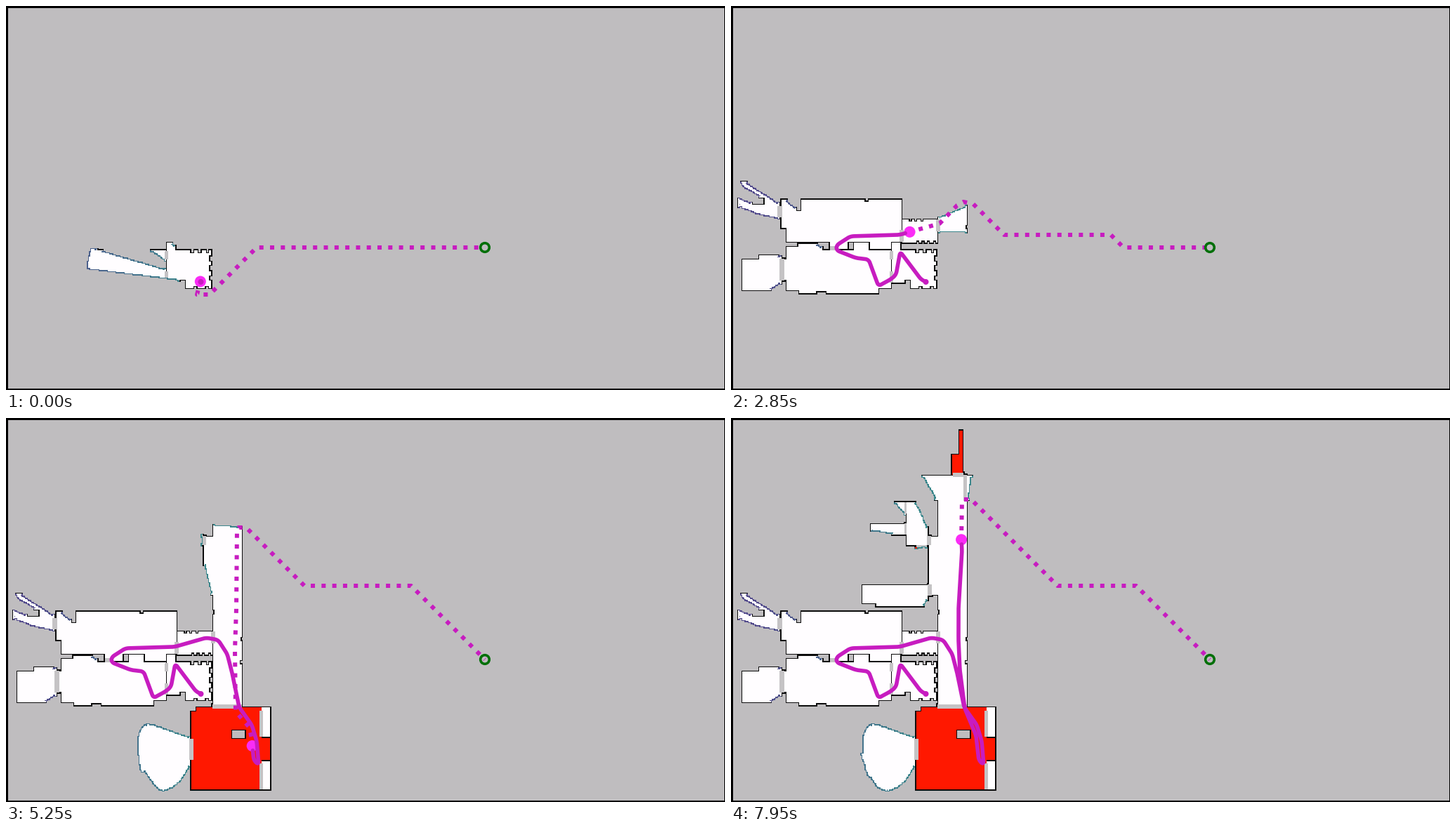
These frames come from a looping animation (1024 by 547 pixels, 8 s). A matplotlib script:

```python
import numpy as np
import matplotlib.pyplot as plt
from matplotlib.animation import FuncAnimation
from matplotlib.patches import Circle, Rectangle

WIDTH, HEIGHT, DPI = 1024, 547, 64
PX = 72 / DPI                      # points per pixel
FRAMES, STEP = 160, 50
CELL, COLS, ROWS = 1.5, 683, 365   # map grid
SENSOR = 161                       # sensor range in pixels

WALL, FREE, RED, DOOR = range(4)
GREY, BLACK = (191, 189, 191), (12, 12, 12)
FILL = np.array([BLACK, (255, 253, 255), (255, 24, 0), (197, 195, 197)], np.uint8)
TRAIL, ROBOT, GOAL = "#c71cc0", "#fa2cf6", "#006f08"
TARGET = (682, 344)

label = np.zeros((ROWS, COLS), np.uint8)


# ---- floor plan: everything that is not carved out is wall ----

def cells(*values):
    return [int(v / CELL) for v in values]


def room(x0, y0, x1, y1, kind=FREE):
    """Carve the space inside walls that run along the given sides."""
    c0, r0, c1, r1 = cells(x0, y0, x1, y1)
    label[r0 + 1:r1, c0 + 1:c1] = kind


def block(x0, y0, x1, y1, kind=WALL):
    c0, r0, c1, r1 = cells(x0, y0, x1, y1)
    label[r0:r1 + 1, c0:c1 + 1] = kind


def vdoor(x, y0, y1, width=4):
    block(x - width / 2, y0, x + width / 2, y1, DOOR)


def hdoor(y, x0, x1, width=4):
    block(x0, y - width / 2, x1, y + width / 2, DOOR)


def build_start_room():
    room(229, 347, 293, 403)
    room(229, 337, 242, 350)
    block(229, 395, 255, 403)
    block(248, 391, 255, 395)
    for x in range(263, 290, 11):
        block(x, 347, x + 4, 352)
    for y in range(356, 395, 14):
        block(290, y, 293, y + 7)
    for x in (267, 284):
        block(x, 400, x + 5, 403)


def build_west():
    room(79, 347, 229, 410)                 # lower hall and its recesses
    room(79, 343, 97, 349)
    room(95, 338, 131, 349)
    room(174, 337, 197, 349)
    block(79, 405, 96, 410)
    block(122, 407, 136, 410)
    block(211, 403, 229, 410)
    room(16, 361, 72, 406)                  # west room
    room(40, 355, 72, 363)
    room(67, 360, 82, 391)
    room(79, 275, 243, 337)                 # upper hall and its recesses
    room(71, 275, 81, 317)
    room(140, 335, 167, 347)
    room(197, 335, 229, 347)
    block(93, 275, 99, 292)
    block(191, 275, 196, 278)
    room(10, 250, 69, 306)                  # far west nook
    block(30, 273, 47, 282)
    room(243, 304, 294, 338)                # link to the corridor
    for x in range(254, 275, 8):
        block(x, 304, x + 3, 307)
    for x in range(264, 290, 8):
        block(x, 335, x + 3, 338)


def build_corridor():
    room(294, 110, 336, 412)
    room(281, 168, 297, 253)
    room(250, 81, 360, 118)                 # lobby
    block(294, 274, 296, 280)
    block(335, 313, 336, 317)
    block(334, 346, 336, 350)
    room(314, 51, 331, 81, RED)
    room(324, 17, 331, 53, RED)
    room(249, 119, 281, 182)                # side rooms
    room(198, 150, 249, 167)
    room(230, 119, 249, 146)
    room(231, 183, 281, 200, RED)
    room(187, 237, 281, 269)
    block(187, 264, 206, 269)


def build_red_room():
    room(263, 412, 377, 530, RED)
    room(150, 425, 263, 540)
    block(263, 412, 270, 417)
    block(322, 444, 341, 457)
    for y0, y1, side in ((412, 455, 455), (488, 530, 488)):
        room(363, y0, 377, y1)
        block(365, side, 377, side)
        vdoor(363, y0 + 5, y1 - 2, 3)


def build_doors():
    vdoor(73, 360, 391, 6)
    vdoor(69.5, 286, 301, 5)
    vdoor(229, 350, 361, 3)
    vdoor(229, 379, 394, 3)
    hdoor(345, 141, 152, 5)
    vdoor(243, 320, 335)
    vdoor(295, 305, 320)
    hdoor(411, 295, 335)
    vdoor(264, 458, 487)
    hdoor(81, 317, 330)
    vdoor(333, 82, 117, 3)
    vdoor(282, 169, 181)
    vdoor(249, 151, 166, 2)
    vdoor(249, 121, 136, 2)
    hdoor(183, 265, 278, 2)
    vdoor(283, 238, 252)


for build in (build_start_room, build_west, build_corridor, build_red_room, build_doors):
    build()


# ---- robot motion: constant speed along a rounded path ----

CORNERS = np.array([
    (278, 393), (271, 390), (241, 350), (235, 383), (228, 389), (210, 399), (196, 361),
    (178, 359), (150, 348), (150, 341), (170, 328), (240, 326), (285, 313), (302, 316),
    (315, 336), (322, 363), (332, 412), (350, 437), (357, 460), (360, 494), (353, 488),
    (349, 452), (333, 414), (326, 360), (324, 318), (324, 272), (329, 190), (328, 172)], float)
TICK = 10
LAST = (FRAMES - 1) * STEP


def along(pts, count):
    """Points at equal distances along a polyline."""
    dist = np.r_[0, np.cumsum(np.hypot(*np.diff(pts, axis=0).T))]
    s = np.linspace(0, dist[-1], count)
    return np.column_stack([np.interp(s, dist, pts[:, k]) for k in (0, 1)])


def rounded(pts, half=10):
    padded = np.pad(pts, ((half, half), (0, 0)), mode="edge")
    kernel = np.ones(2 * half + 1) / (2 * half + 1)
    return np.column_stack([np.convolve(padded[:, k], kernel, "valid") for k in (0, 1)])


path = along(rounded(along(CORNERS, 1800)), LAST // TICK + 1)


# ---- exploration: the step at which each cell is first seen ----

def shifts(grid):
    return [np.roll(grid, (dy, dx), (0, 1))
            for dy in (-1, 0, 1) for dx in (-1, 0, 1) if dy or dx]


def spread(mask):
    return np.logical_or.reduce(shifts(mask))


def explore():
    seen = np.full((ROWS, COLS), FRAMES, int)
    angle = np.linspace(0, 2 * np.pi, 1400, endpoint=False)[:, None]
    reach = np.arange(0, SENSOR / CELL, .7)
    dx, dy = np.cos(angle) * reach, np.sin(angle) * reach
    for n in range(FRAMES):
        x, y = path[n * STEP // TICK] / CELL
        cx = np.clip((x + dx).astype(int), 0, COLS - 1)
        cy = np.clip((y + dy).astype(int), 0, ROWS - 1)
        hit = label[cy, cx] == WALL
        hit[:, :4] = False
        clear = ~np.logical_or.accumulate(hit, axis=1)
        cy, cx = cy[clear], cx[clear]
        seen[cy, cx] = np.minimum(seen[cy, cx], n)
    # cells touching a wall are known as soon as a neighbour is
    seen[label == WALL] = FRAMES
    by_wall = spread(label == WALL) & (label != WALL)
    nearest = np.minimum.reduce(shifts(seen))
    return np.where(by_wall, np.minimum(seen, nearest), seen)


seen = explore()

# frontier colour drifts from violet in the west to teal in the east
mix = np.clip((np.arange(COLS) * CELL - 40) / 220, 0, 1)[:, None]
frontier = ((1 - mix) * (84, 76, 140) + mix * (60, 135, 140)).astype(np.uint8)


def map_image(n):
    known = (seen <= n) & (label != WALL)
    rim = spread(known) & ~known
    edge = rim & (label != WALL)
    img = np.full((ROWS, COLS, 3), GREY, np.uint8)
    img[known] = FILL[label[known]]
    img[rim] = BLACK
    img[edge] = frontier[np.nonzero(edge)[1]]
    return img


# ---- planned route ----

def approach(pts, lane, knee):
    """Diagonal to a lane, along it to the knee, diagonal to the target's height."""
    x, y = pts[-1]
    return pts + [(x + abs(lane - y), lane), (knee, lane),
                  (knee + abs(TARGET[1] - lane), TARGET[1]), TARGET]


def north(y):
    """Up the corridor to the edge of the sensor's reach."""
    top = np.clip(y - 160, 116, 156)
    return [(350, 456), (346, 440), (327, 418), (326, 330), (328, 272),
            (329, top + 2), (331, top), (342, top)]


# start time, points on the way out, lane, knee
ROUTES = [
    (0, [(262, 400), (272, 411), (290, 411)], 344, 541),
    (300, [(213, 400), (211, 409), (228, 411), (290, 411)], 344, 541),
    (1050, [(196, 361), (187, 335)], 327, 541),
    (1500, [(150, 346)], 327, 541),
    (2550, [(297, 310), (322, 284), (331, 279), (345, 282)], 326, 541),
    (3250, [(327, 400), (331, 413), (342, 419)], 366, 541),
    (4450, [(362, 528), (367, 540), (379, 539)], 440, 586),
    (5050, north, 239, 577)]


def route(t, here):
    _, way, lane, knee = [r for r in ROUTES if r[0] <= t][-1]
    pts = np.array(approach(way(here[1]) if callable(way) else way, lane, knee), float)
    k = np.argmin(np.hypot(*(pts - here).T))
    if np.dot(pts[k + 1] - pts[k], here - pts[k]) > 0:   # already passed
        k += 1
    return np.vstack([here, pts[k:]])


# ---- drawing ----

fig = plt.figure(figsize=(WIDTH / DPI, HEIGHT / DPI), dpi=DPI)
ax = fig.add_axes([0, 0, 1, 1])
floor = ax.imshow(map_image(0), extent=(0, COLS * CELL, ROWS * CELL, 0),
                  interpolation="nearest", aspect="auto")
ax.set_xlim(0, WIDTH)
ax.set_ylim(HEIGHT, 0)
ax.axis("off")
ax.add_patch(Rectangle((.5, 1), WIDTH - 1, HEIGHT - 2, fill=False, ec="black",
                       lw=3 * PX, zorder=9))
ax.add_patch(Circle(TARGET, 6.3, fill=False, ec=GOAL, lw=3.6 * PX, zorder=5))
dots, = ax.plot([], [], color=TRAIL, lw=6 * PX, ls=(.35, (1, 1.55)),
                dash_capstyle="butt", zorder=2)
robot = ax.add_patch(Circle((0, 0), 8, color=ROBOT, lw=0, zorder=3))
trail, = ax.plot([], [], color=TRAIL, lw=5.6 * PX, solid_capstyle="round",
                 solid_joinstyle="round", zorder=4)
ax.add_patch(Circle((277.5, 393), 4, color=TRAIL, lw=0, zorder=4))


def draw(n):
    i = n * STEP // TICK
    floor.set_data(map_image(n))
    dots.set_data(*route(n * STEP, path[i]).T)
    robot.center = path[i]
    trail.set_data(*path[:max(i - 6, 0) + 1].T)   # lags a little behind
    return floor, dots, robot, trail


anim = FuncAnimation(fig, draw, frames=FRAMES, interval=STEP, repeat=True, repeat_delay=0)
plt.show()
```
